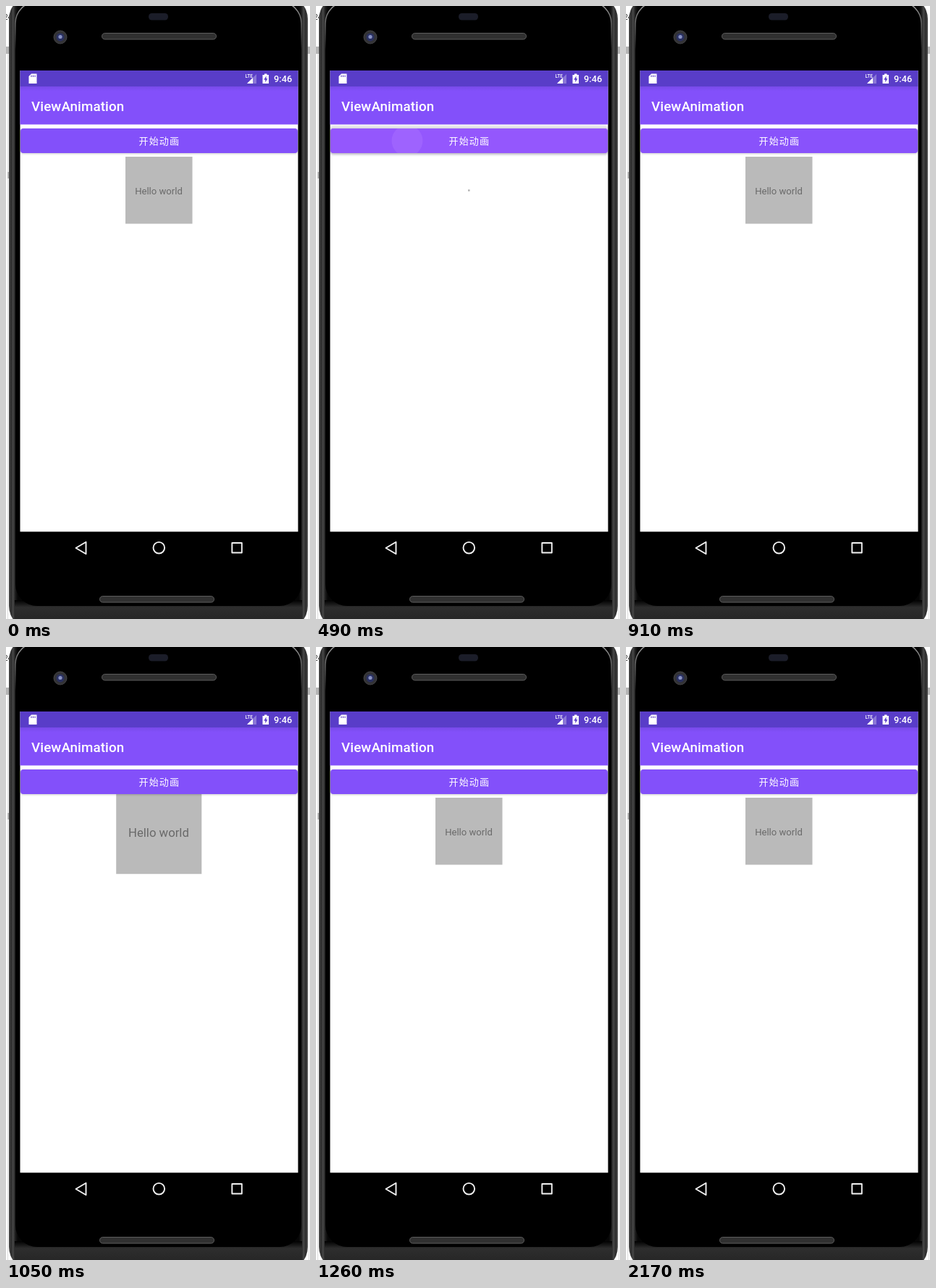
An HTML page that plays this animation: 420 by 846 pixels, repeating every 2240 ms.

```html
<!DOCTYPE html>
<html lang="zh">
<head>
<meta charset="utf-8">
<title>ViewAnimation</title>
<style>
  html, body { margin: 0; width: 100%; height: 100%; overflow: hidden; background: #fff; }
  svg { display: block; width: 420px; height: 846px; font-family: Roboto, sans-serif; }
  .title { font-size: 18.8px; font-weight: 500; letter-spacing: .1px; }
  .clock { font-size: 12.8px; font-weight: 500; }
  .label { font: 13px "Noto Sans CJK SC", "Noto Sans CJK", sans-serif; letter-spacing: 1.16px; }
  .hello { font-size: 13.1px; }
  .lte { font-size: 6.5px; font-weight: 500; }
</style>
</head>
<body>
<svg viewBox="0 0 420 846">
  <defs>
    <linearGradient id="side">
      <stop offset="0" stop-color="#4a4a4a"/>
      <stop offset=".008" stop-color="#2c2c2c"/>
      <stop offset=".014" stop-color="#484848"/>
      <stop offset=".022" stop-color="#1a1a1a"/>
      <stop offset=".03" stop-color="#060606"/>
      <stop offset=".97" stop-color="#060606"/>
      <stop offset=".978" stop-color="#1a1a1a"/>
      <stop offset=".986" stop-color="#484848"/>
      <stop offset=".992" stop-color="#2c2c2c"/>
      <stop offset="1" stop-color="#4a4a4a"/>
    </linearGradient>
    <linearGradient id="chin" x2="0" y2="1">
      <stop offset="0" stop-color="#000"/>
      <stop offset=".25" stop-color="#2e2e2e"/>
      <stop offset="1" stop-color="#202020"/>
    </linearGradient>
    <linearGradient id="shine" gradientUnits="userSpaceOnUse" x1="0" y1="0" x2="0" y2="60">
      <stop offset="0" stop-color="#9a9a9a"/>
      <stop offset="1" stop-color="#9a9a9a" stop-opacity="0"/>
    </linearGradient>
    <linearGradient id="bar" x2="0" y2="1">
      <stop offset="0" stop-color="#784ae8"/>
      <stop offset=".12" stop-color="#8350fa"/>
      <stop offset="1" stop-color="#8350fa"/>
    </linearGradient>
    <filter id="blur" x="-10%" y="-50%" width="120%" height="200%">
      <feGaussianBlur stdDeviation="1.6"/>
    </filter>
    <filter id="soft" x="-5%" y="-20%" width="110%" height="140%">
      <feGaussianBlur stdDeviation=".7"/>
    </filter>
    <clipPath id="body"><rect x="4" y="-14" width="413" height="874" rx="32"/></clipPath>
    <clipPath id="screen"><rect x="19" y="89" width="385" height="636.500"/></clipPath>
    <clipPath id="button"><rect x="20" y="169" width="383" height="34" rx="4"/></clipPath>
  </defs>

  <!-- phone -->
  <path d="M2.5 56V846M418.500 56V846" stroke="#dadada"/>
  <path d="M0 56H6V66H0ZM2 229H7V238H2ZM416 56H420V66H416Z" fill="#b4b4b4"/>
  <text x="-3" y="19" font-size="10" fill="#333">24</text>
  <g clip-path="url(#body)">
    <rect x="4" y="-14" width="413" height="874" fill="url(#side)"/>
    <rect x="12" y="820" width="397" height="40" fill="url(#chin)"/>
    <rect x="13" y="-6" width="395" height="834" rx="30" fill="#000" stroke="url(#shine)" stroke-width="1.500"/>
  </g>
  <rect x="197" y="10" width="27" height="9.500" rx="4.500" fill="#1b1d29"/>
  <circle cx="75" cy="43" r="9" fill="#333336" stroke="#464648"/>
  <circle cx="75" cy="43" r="5.500" fill="#2a3160"/>
  <circle cx="75" cy="42.500" r="2.600" fill="#8791c4"/>
  <g fill="#303030" stroke="#5c5c5c">
    <rect x="132.500" y="37.500" width="158" height="8.500" rx="4.200"/>
    <rect x="129.500" y="814.500" width="158" height="8.500" rx="4.200"/>
  </g>

  <!-- app -->
  <rect x="19.500" y="89" width="384" height="636.500" fill="#fff"/>
  <g filter="url(#soft)">
    <rect x="19.500" y="89" width="384" height="22" fill="#593dc8"/>
    <rect x="19.500" y="111" width="384" height="52.500" fill="url(#bar)"/>
  </g>
  <g fill="#fff">
    <path d="M35 93.500H42.500V107H31.500V97Z"/>
    <path d="M35 95.500V98M37.500 95.500V98M40 95.500V98" stroke="#593dc8" stroke-width="1.100"/>
    <text class="lte" x="330.500" y="99">LTE</text>
    <path d="M346 94V107H333Z" opacity=".3"/>
    <path d="M341 99V107H333Z"/>
    <path d="M357 93.500H360.500V95H363V107H354.500V95H357Z"/>
    <path d="M359.500 96.500L356.300 101.700H358.300V105.300L361.400 100.300H359.500Z" fill="#593dc8"/>
    <text class="clock" x="370" y="105">9:46</text>
    <text class="title" x="35" y="145">ViewAnimation</text>
  </g>

  <g clip-path="url(#screen)">
    <g id="box">
      <rect x="165" y="208" width="92.500" height="92.500" fill="#bababa"/>
      <text class="hello" x="211" y="260" text-anchor="middle" fill="#696969">Hello world</text>
    </g>
    <rect id="lift" x="19" y="165" width="385" height="41" rx="5" fill="#30205c" filter="url(#blur)"/>
    <rect x="20" y="170" width="383" height="34" rx="4" fill="#000" opacity=".2" filter="url(#blur)"/>
    <g filter="url(#soft)">
      <g clip-path="url(#button)">
        <rect x="20" y="169" width="383" height="34" fill="#8350fa"/>
        <rect id="glow" x="20" y="169" width="383" height="34" fill="#a860ff"/>
        <circle id="ripple" cx="126" cy="186" fill="#c493ff"/>
      </g>
    </g>
    <text class="label" x="183.500" y="190.500" fill="#fff">开始动画</text>
  </g>

  <!-- navigation -->
  <g fill="none" stroke="#f2f2f2" stroke-width="1.900" stroke-linejoin="round">
    <path d="M96.500 748L110.500 739.800V756.200Z"/>
    <circle cx="211.300" cy="747.700" r="7.800"/>
    <rect x="312.300" y="741" width="13.500" height="13.500"/>
  </g>
</svg>
<script>
  const LOOP = 2240, STEP = 70, CLICK = 420, END = 1260;
  const [box, lift, glow, ripple] =
    ["box", "lift", "glow", "ripple"].map(id => document.getElementById(id));

  // Linear interpolation through [time, value] points
  function track(points, t) {
    const i = points.findIndex(p => p[0] > t);
    if (i < 0) return points[points.length - 1][1];
    if (i === 0) return points[0][1];
    const [t0, a] = points[i - 1], [t1, b] = points[i];
    return a + (b - a) * (t - t0) / (t1 - t0);
  }

  const progress = [[420, 0], [700, .359], [910, .641], [1050, .808], [1120, .917], [1190, 1]];
  const glowAlpha = [[350, 0], [420, .2], [560, .7], [700, .64], [910, .15], [1050, 0]];
  const rippleAlpha = [[420, 0], [490, .2], [700, .2], [910, 0]];
  const radius = [[420, 0], [700, 86], [910, 140]];
  const liftAlpha = [[280, 0], [350, .09], [420, .18], [490, .15], [630, 0]];

  // Ease in and out from nothing to 1.4, then snap back
  function boxScale(t) {
    if (t <= CLICK || t >= END) return 1;
    return 1.4 * (1 - Math.cos(Math.PI * track(progress, t))) / 2;
  }

  function draw(now) {
    const t = Math.floor(now % LOOP / STEP) * STEP;
    box.setAttribute("transform",
      `translate(211.3 254.5) scale(${boxScale(t)}) translate(-211.3 -254.5)`);
    lift.setAttribute("opacity", track(liftAlpha, t));
    glow.setAttribute("opacity", track(glowAlpha, t));
    ripple.setAttribute("opacity", track(rippleAlpha, t));
    ripple.setAttribute("r", track(radius, t));
  }

  const start = performance.now();
  function tick() {
    draw(performance.now() - start);
    requestAnimationFrame(tick);
  }
  tick();
</script>
</body>
</html>
```
